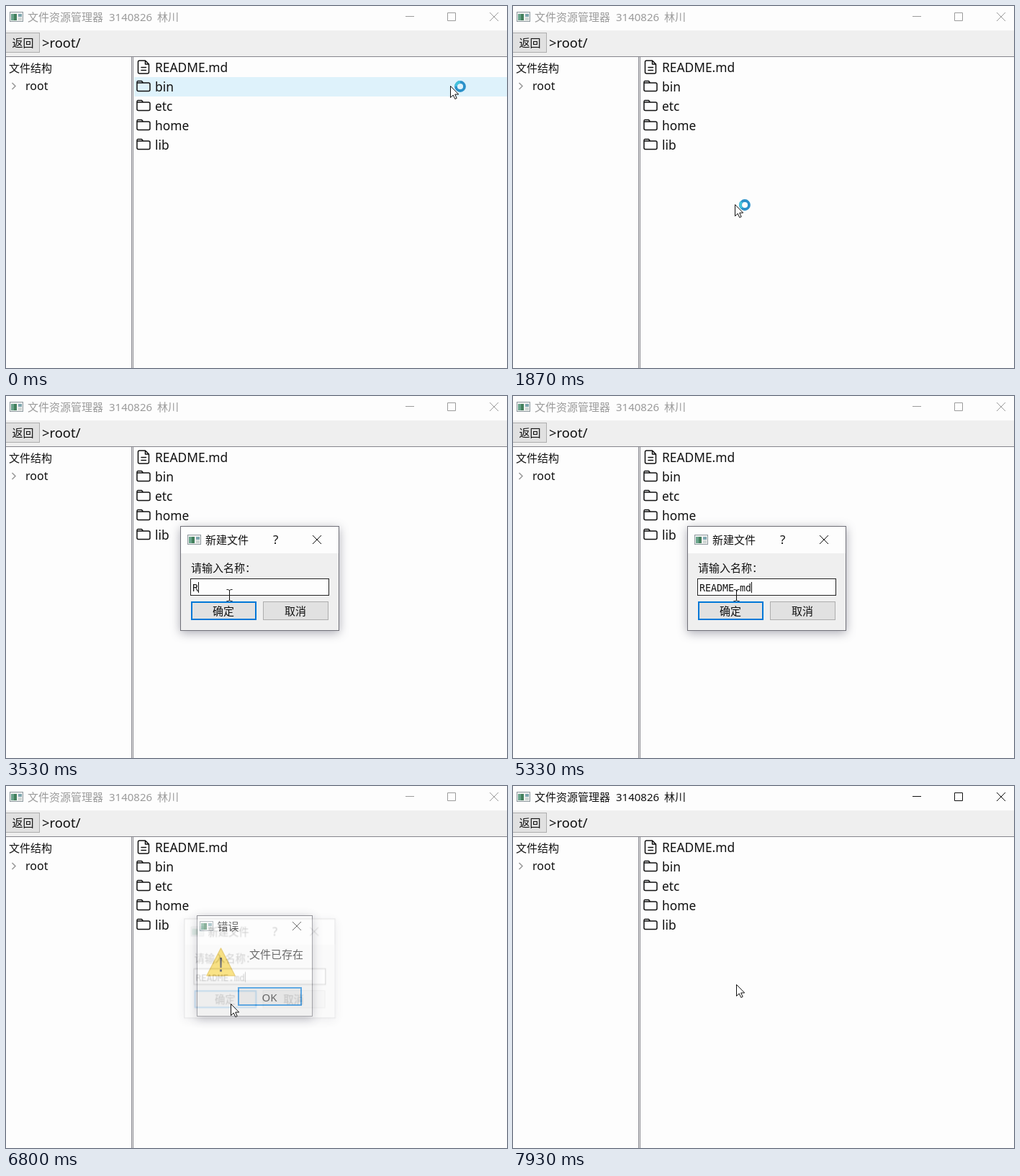
An HTML page that plays this animation: 696x504 px, repeating every 8000 ms.

```html
<!DOCTYPE html>
<html lang="zh-CN">
<head>
<meta charset="utf-8">
<title>文件资源管理器</title>
<style>
  html, body { margin: 0; width: 100%; height: 100%; overflow: hidden; background: #fdfdfd; }
  svg { display: block; width: 696px; height: 504px; }
  text { font: 15px "Noto Sans", "Noto Sans CJK SC", "Noto Sans CJK", sans-serif; fill: currentColor; white-space: pre; }
  .line { fill: none; stroke: currentColor; }
  .list text { font-size: 17.35px; }
  .icon { fill: none; stroke: #111; stroke-width: 1.5; stroke-linejoin: round; stroke-linecap: round; }
  .face { fill: #efefef; }
  .btn { fill: #e1e1e1; stroke: #adadad; }
  .focus { stroke: #0078d7; stroke-width: 2; }
  .frame { fill: #fdfdfd; stroke: #707078; }
  .entry { font: 13.3px "DejaVu Sans Mono", monospace; }

  .title, .hover, .menu, .ask, .error, .pen, .caret, .cursor, .arrow, .ring, .beam {
    animation: 8s linear infinite;
  }
  .title, .hover, .menu, .pen, .caret, .arrow, .ring, .beam { animation-timing-function: step-end; }
  .ask, .error { transform-box: fill-box; transform-origin: center; filter: drop-shadow(0 3px 7px rgba(60, 60, 80, .42)); }

  .title { animation-name: title; }
  @keyframes title {
    0%, 23.375% { color: #9b9b9b; }
    9.25%, 93.75%, 100% { color: #111; }
  }
  .hover { animation-name: hover; }
  @keyframes hover {
    0% { transform: none; opacity: 1; }
    2.3% { transform: translateY(27px); }
    3.84% { transform: translateY(54px); }
    5% { transform: translateY(81px); opacity: 1; }
    5.96%, 100% { transform: translateY(81px); opacity: 0; }
  }
  .menu { animation-name: menu; filter: drop-shadow(3px 3px 1px rgba(80, 80, 80, .5)); }
  @keyframes menu {
    0%, 23.375%, 100% { opacity: 0; }
    12.375% { opacity: 1; }
  }
  .ask { animation-name: ask; }
  @keyframes ask {
    0%, 23.6% { opacity: 0; transform: scale(.92); animation-timing-function: ease-out; }
    26.8%, 83.5% { opacity: 1; transform: none; }
    85.375%, 100% { opacity: 0; transform: scale(.94); }
  }
  .error { animation-name: error; }
  @keyframes error {
    0%, 84% { opacity: 0; transform: scale(.94); }
    85% { opacity: .75; transform: none; }
    87%, 93.75% { opacity: 1; transform: none; }
    96.2%, 100% { opacity: 0; transform: scale(.94); }
  }
  .pen { animation-name: pen; }
  @keyframes pen {
    0% { transform: none; }
    44.125% { transform: translateX(8px); }
    46.625% { transform: translateX(16px); }
    48.75% { transform: translateX(24px); }
    51.25% { transform: translateX(32px); }
    54.625% { transform: translateX(40px); }
    56.25% { transform: translateX(48px); }
    60.375% { transform: translateX(56px); }
    65% { transform: translateX(64px); }
    66.625%, 100% { transform: translateX(72px); }
  }
  .caret { animation-name: caret; }
  @keyframes caret {
    0%, 37.125%, 81.25%, 100% { opacity: 1; }
    30.375%, 74.625% { opacity: 0; }
  }
  .cursor { animation-name: cursor; }
  @keyframes cursor {
    0%, .375% { transform: translate(617px, 111px); animation-timing-function: ease-in-out; }
    10%, 11% { transform: translate(294px, 262px); }
    11.8%, 13% { transform: translate(290px, 256px); animation-timing-function: ease-in-out; }
    17.5%, 23.75% { transform: translate(308px, 276px); }
    24.2%, 74.625% { transform: translate(310px, 277px); animation-timing-function: ease-in-out; }
    80% { transform: translate(317px, 306px); animation-timing-function: ease-in-out; }
    84%, 89.625% { transform: translate(312px, 303px); animation-timing-function: ease-in-out; }
    93.2%, 94% { transform: translate(350px, 297px); animation-timing-function: ease-in-out; }
    99.1%, 100% { transform: translate(310px, 276px); }
  }
  .arrow { animation-name: arrow; }
  @keyframes arrow {
    0%, 75.5%, 100% { opacity: 1; }
    24.2% { opacity: 0; }
  }
  .ring { animation-name: ring; }
  @keyframes ring {
    0% { opacity: 1; }
    24.2%, 100% { opacity: 0; }
  }
  .beam { animation-name: beam; }
  @keyframes beam {
    0%, 75.5%, 100% { opacity: 0; }
    24.2% { opacity: 1; }
  }
  .spin { animation: spin 1s linear infinite; }
  @keyframes spin { to { transform: rotate(360deg); } }
</style>
</head>
<body>
<svg viewBox="0 0 696 504" color="#111">
  <defs>
    <g id="app">
      <rect x=".5" y=".5" width="18" height="13" fill="#f0f0f0" stroke="#8f9a9f"/>
      <rect x="2" y="3" width="8" height="9" fill="#43805c"/>
      <rect x="2" y="3" width="4" height="9" fill="#6aa48c"/>
      <rect x="12" y="3" width="5" height="4" fill="#7fa7b0"/>
      <rect x="12" y="8" width="5" height="4" fill="#cfd7d4"/>
    </g>
    <path id="close" class="line" d="M-6-6 6 6M6-6-6 6"/>
    <path id="folder" class="icon" d="M2 1H7.5L9.5 3.5H17Q19 3.5 19 5.5V13Q19 15 17 15H3Q1 15 1 13V3Q1 1 2 1M1.5 3.5H9.5"/>
  </defs>

  <rect width="696" height="504" fill="#fdfdfd"/>
  <rect y="34" width="696" height="36" class="face"/>

  <use href="#app" x="5" y="8"/>
  <g class="title">
    <text x="30" y="21">文件资源管理器</text>
    <text x="143" y="21">3140826</text>
    <text x="210" y="21">林川</text>
    <path class="line" d="M555 14.5H567M613.5 9.5H624.5V20.5H613.5Z"/>
    <use href="#close" x="678" y="15"/>
  </g>

  <rect x="-.5" y="37.5" width="47" height="27" class="btn"/>
  <text x="8.5" y="57">返回</text>
  <text x="50" y="57.5" style="font-size:18.4px;font-weight:300">&gt;root/</text>

  <rect x="175" y="71" width="1" height="433" class="face"/>
  <path class="line" d="M0 70.5H696M174.5 71V504M176.5 71V504" style="stroke:#85858c"/>
  <text x="4" y="92">文件结构</text>
  <path class="line" d="M8.5 107 13 111.5 8.5 116" style="stroke:#999;stroke-width:1.5"/>
  <text x="27" y="117" style="font-size:16px">root</text>

  <rect class="hover" x="178" y="99" width="518" height="27" fill="#def2fb"/>
  <path class="icon" d="M185.5 76H193.5L198.5 81V92Q198.5 94 196.5 94H185.5Q183.5 94 183.500 92V78Q183.5 76 185.5 76M193.5 76V81H198.5M188 85.5H194.5M188 89.5H194.5"/>
  <use href="#folder" x="181" y="103.5"/>
  <use href="#folder" x="181" y="130.5"/>
  <use href="#folder" x="181" y="157.5"/>
  <use href="#folder" x="181" y="184.5"/>
  <g class="list">
    <text x="207" y="92">README.md</text>
    <text x="207" y="119">bin</text>
    <text x="207" y="146">etc</text>
    <text x="207" y="173">home</text>
    <text x="207" y="200">lib</text>
  </g>

  <g class="menu">
    <rect x="290.5" y="256.5" width="137" height="106" class="face" stroke="#a0a0a0"/>
    <rect x="293" y="259" width="132" height="25" fill="#91c9f7"/>
    <text x="322" y="277">新建文件</text>
    <text x="322" y="302">新建文件夹</text>
    <text x="322" y="327">粘贴</text>
    <text x="322" y="352">刷新</text>
  </g>

  <g class="error">
    <rect x="265.5" y="180.5" width="160" height="140" class="frame"/>
    <rect x="266" y="270" width="159" height="50" class="face"/>
    <use href="#app" x="269" y="188"/>
    <text x="293.5" y="201">错误</text>
    <use href="#close" x="404" y="195"/>
    <path d="M298.5 226 318 264H279Z" fill="#f8d33a" stroke="#dfb52a" stroke-width="1.5" stroke-linejoin="round"/>
    <path d="M297 239H300L299.5 253H297.5ZM297 255.5H300V258.5H297Z" fill="#222"/>
    <text x="338" y="240">文件已存在</text>
    <rect x="323" y="281" width="87" height="24" class="btn focus"/>
    <text x="355.5" y="299.5">OK</text>
  </g>

  <g class="ask">
    <rect x="242.5" y="181.5" width="220" height="145" class="frame"/>
    <rect x="243" y="219" width="219" height="107" class="face"/>
    <use href="#app" x="252" y="193"/>
    <text x="277" y="206">新建文件</text>
    <text x="371" y="206" style="font-size:17px">?</text>
    <use href="#close" x="432" y="200"/>
    <text x="257" y="245">请输入名称：</text>
    <rect x="256.5" y="254.5" width="192" height="23" fill="#fdfdfd" stroke="#222"/>
    <text x="259" y="272" class="entry">README.md</text>
    <g class="pen">
      <rect x="259" y="257" width="90" height="18" fill="#fdfdfd"/>
      <rect class="caret" x="259" y="259" width="1" height="15" fill="#111"/>
    </g>
    <rect x="258" y="287" width="89" height="24" class="btn focus"/>
    <text x="287" y="305">确定</text>
    <rect x="357.5" y="286.5" width="90" height="25" class="btn"/>
    <text x="387" y="305">取消</text>
  </g>

  <g class="cursor">
    <path class="arrow" d="M.5.5V16.5L4.2 13 6.8 18.5 9.2 17.4 6.7 12H11.7Z" fill="#fff" stroke="#111"/>
    <g class="ring">
      <g transform="translate(14 1)" fill="none" stroke-width="3.8">
        <circle r="6" stroke="#2b91c9"/>
        <path class="spin" d="M-6 0A6 6 0 0 1 0-6" stroke="#45c3dc"/>
      </g>
    </g>
    <path class="beam line" d="M-3.5-7.5H-1.5L.5-6.5 2.5-7.5H4.5M.5-6.5V7.5M-3.5 8.5H-1.5L.5 7.5 2.5 8.5H4.5"/>
  </g>
</svg>
</body>
</html>
```
